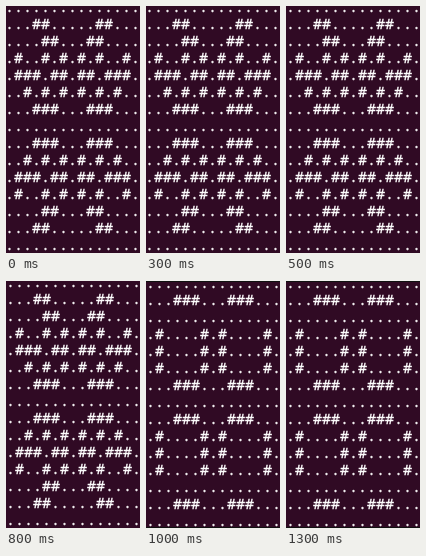
Recreate the animation shown at these times as an HTML page. Size 134x247 px, loop 1.5 s.

```html
<!DOCTYPE html>
<html lang="en">
<head>
<meta charset="utf-8">
<title>Pulsar</title>
<style>
html, body { margin: 0; width: 100%; height: 100%; overflow: hidden; background: #300a24; }
svg { display: block; width: 134px; height: 247px; }
text { font: 500 15px "Noto Sans Mono", monospace; fill: #fff; stroke: #fff; stroke-width: .3; }
</style>
</head>
<body>
<svg viewBox="0 0 134 247">
  <g id="grid"></g>
  <path id="edges" d="M0 .5H134M0 246.5H134" stroke="#111"/>
</svg>
<script>
const SIZE = 15, CELL_W = 9, CELL_H = 17, STEP = 500;
const grid = document.getElementById('grid');
const edges = document.getElementById('edges');

// Upper half of each pattern; the lower half mirrors it.
const dense = [
  '...............',
  '...##.....##...',
  '....##...##....',
  '.#..#.#.#.#..#.',
  '.###.##.##.###.',
  '..#.#.#.#.#.#..',
  '...###...###...',
  '...............'
];
const sparse = [
  '...............',
  '...###...###...',
  '...............',
  '.#....#.#....#.',
  '.#....#.#....#.',
  '.#....#.#....#.',
  '...###...###...',
  '...............'
];
const poses = [
  { half: dense, x: -1, y: 6, edged: false },
  { half: dense, x: 0, y: 6, edged: false },
  { half: sparse, x: 0, y: 7, edged: true }
];

const columns = Array.from({ length: SIZE }, (_, i) => i * CELL_W).join(' ');
const rows = Array.from({ length: SIZE }, (_, i) => {
  const row = document.createElementNS('http://www.w3.org/2000/svg', 'text');
  row.setAttribute('x', columns);
  row.setAttribute('y', i * CELL_H);
  return grid.appendChild(row);
});

let shown = -1;
function draw(time) {
  const index = Math.floor(time / STEP) % poses.length;
  if (index === shown) return;
  shown = index;
  const { half, x, y, edged } = poses[index];
  rows.forEach((row, i) => { row.textContent = half[Math.min(i, SIZE - 1 - i)]; });
  grid.setAttribute('transform', `translate(${x} ${y})`);
  edges.setAttribute('visibility', edged ? 'visible' : 'hidden');
}

const start = performance.now();
function tick() {
  draw(performance.now() - start);
  requestAnimationFrame(tick);
}
tick();
</script>
</body>
</html>
```
